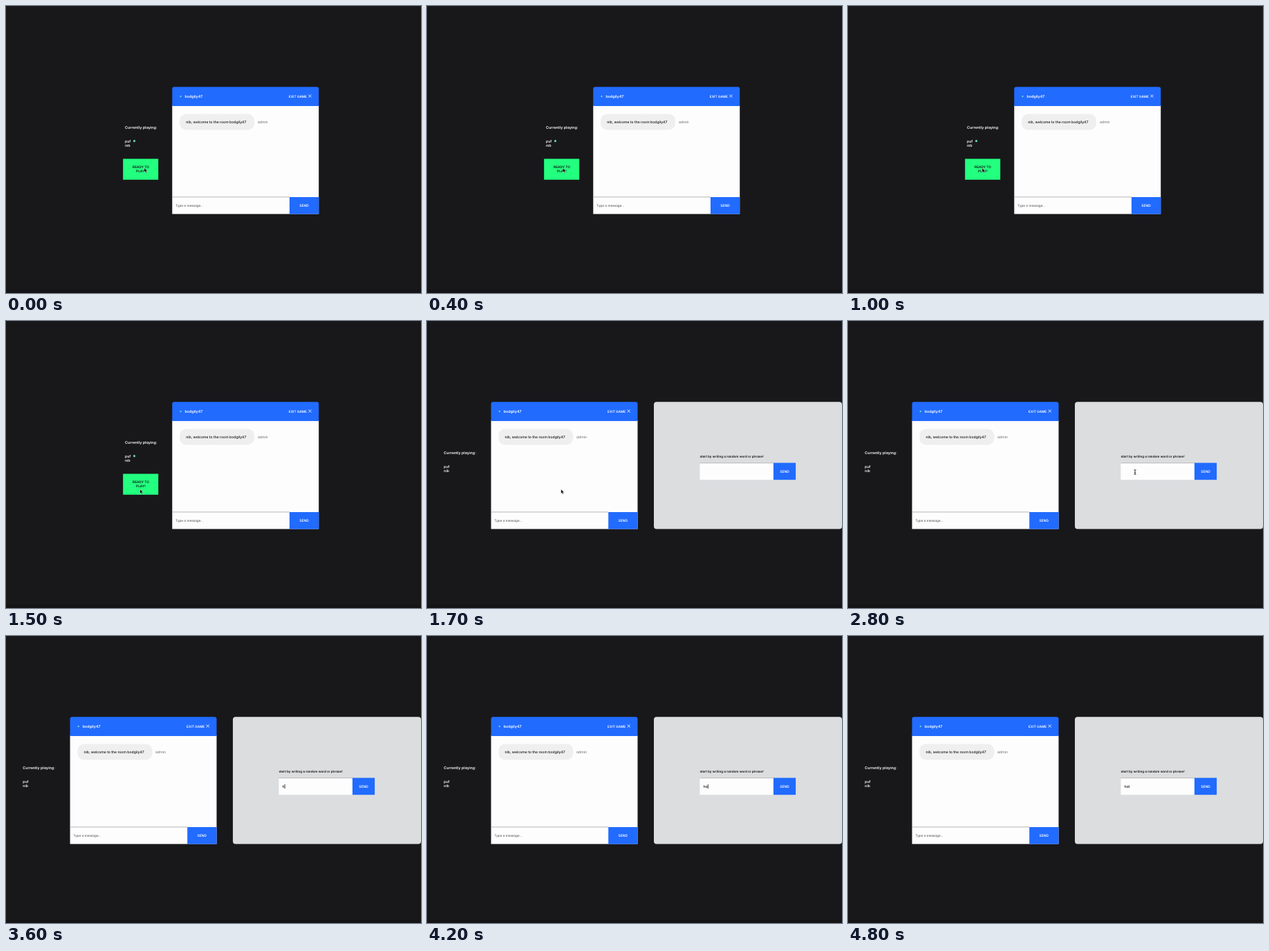
An HTML page for the animation above (5000 ms loop, 600 px wide and 416 px high).

```html
<!DOCTYPE html>
<html lang="en">
<head>
<meta charset="utf-8">
<title>Word game lobby</title>
<style>
  html, body { margin: 0; width: 100%; height: 100%; overflow: hidden; background: #18181a; }
  svg { display: block; width: 100%; height: 100%; }
  text {
    font: 500 5.1px Inter, sans-serif;
    font-feature-settings: "cv11";
    text-rendering: geometricPrecision;
    fill: #111;
  }
  .bold { font-weight: 600; }
  .light { fill: #fff; font-weight: 600; }
  .title { font-size: 5.35px; }
  .caps { font-size: 4.75px; }
  .middle { text-anchor: middle; }
  .blue { fill: #216bff; }
  .white { fill: #fdfdfd; }
  .rule { stroke: #a5a5a8; stroke-width: .8; }
</style>
</head>
<body>
<svg viewBox="0 0 600 416">
  <rect width="600" height="416" fill="#18181a"/>
  <rect y="411.5" width="600" height="4.5" fill="#141416"/>

  <g id="players">
    <text class="light title" x="172" y="178">Currently playing:</text>
    <text class="light" x="172" y="197.6">puf</text>
    <text class="light" x="172" y="203.6">nib</text>
  </g>

  <g id="lobby">
    <circle cx="185.5" cy="195.7" r="1.6" fill="#5fd3b3"/>
    <rect x="169.2" y="221.5" width="51" height="30.3" fill="#23ff7f"/>
    <text class="bold caps middle" x="195" y="235.3">READY TO</text>
    <text class="bold caps middle" x="195" y="241.3">PLAY!</text>
  </g>

  <g id="chat">
    <path class="white" d="M240.3 144H452.2V301.6H240.3Z"/>
    <path class="blue" d="M240.3 145V120.2Q240.3 117.2 243.3 117.2H449.2Q452.2 117.2 452.2 120.2V145Z"/>
    <circle cx="252.5" cy="131" r="1.2" fill="#5fd3d3"/>
    <text class="light title" x="258.4" y="132.8">bodgily47</text>
    <text class="light caps" x="408.8" y="132.6">EXIT GAME</text>
    <path d="M437.4 128.5l4 4m0 -4l-4 4" stroke="#fff" stroke-width=".9"/>
    <rect x="251" y="156.5" width="108" height="23" rx="9.5" fill="#efefef"/>
    <text x="260.2" y="169.8">nib, welcome to the room bodgily47</text>
    <text x="363.7" y="169.8" style="fill:#666;font-weight:400">admin</text>
    <path class="rule" d="M240.3 276.9H410"/>
    <rect class="blue" x="409.9" y="277" width="42.3" height="24.6"/>
    <text class="light middle" x="431" y="291.1" style="font-size:4.9px">SEND</text>
    <text x="245.3" y="291" style="fill:#444;font-weight:400;font-size:4.6px">Type a message...</text>
  </g>

  <g id="game">
    <rect x="328" y="117.2" width="272" height="184.4" rx="4" fill="#dcdddf"/>
    <text class="bold" x="394.4" y="198.4" style="font-size:4.6px">start by writing a random word or phrase!</text>
    <rect class="white" x="394.4" y="205.6" width="107" height="24.6"/>
    <path class="rule" d="M394.4 205.8H501"/>
    <rect class="blue" x="500.9" y="205.6" width="32.2" height="24.6"/>
    <text class="light middle" x="517" y="219.8" style="font-size:4.9px">SEND</text>
    <text id="word" x="399.4" y="220"></text>
    <rect id="caret" y="215" width=".8" height="6.2" fill="#111"/>
  </g>

  <path id="arrow" d="M0 0V6L1.4 4.8L2.4 7.1L3.5 6.6L2.5 4.4H4.3Z" fill="#000" stroke="#fff" stroke-width=".35"/>
  <path id="beam" d="M-1.5 -3.4Q0 -3.4 0 -2.6Q0 -3.4 1.5 -3.4M0 -2.8V2.8M-1.5 3.4Q0 3.4 0 2.6Q0 3.4 1.5 3.4M-.9 .9H.9" fill="none" stroke="#111" stroke-width=".8"/>
</svg>
<script>
const LOOP = 5000, STEP = 100;
const GAME_START = 1700, BEAM_START = 2700, FOCUS = 2900, FIRST_KEY = 3600;
const BLINK = 500;

// [ms, x, y] of the pointer's hot spot
const pointerPath = [
  [0, 200, 234.8], [500, 195.5, 235], [700, 195.5, 235], [1000, 194, 235],
  [1300, 193.8, 242.5], [1500, 193.8, 244], [2300, 193.8, 244],
  [2400, 204, 242], [2500, 268, 227], [2600, 350, 211], [2700, 405, 214], [2800, 415, 219]
];
// Each key press restarts the caret blink
const typing = [[FOCUS, ""], [FIRST_KEY, "h"], [4000, "ha"], [4300, "hat"]];

const el = id => document.getElementById(id);
const show = (id, visible) => el(id).setAttribute("display", visible ? "inline" : "none");
const move = (id, x, y) => el(id).setAttribute("transform", `translate(${x} ${y})`);

function pointerAt(t) {
  const next = pointerPath.findIndex(p => p[0] > t);
  if (next < 0) return pointerPath.at(-1).slice(1);
  const [t0, x0, y0] = pointerPath[next - 1], [t1, x1, y1] = pointerPath[next];
  const k = (t - t0) / (t1 - t0);
  return [x0 + (x1 - x0) * k, y0 + (y1 - y0) * k];
}

function render(now) {
  const t = Math.floor(now % LOOP / STEP) * STEP;
  const playing = t >= GAME_START;
  show("lobby", !playing);
  show("game", playing);
  move("players", playing ? -147.7 : 0, playing ? 15.2 : 0);
  move("chat", playing ? -147.7 : 0, 0);

  const [x, y] = pointerAt(t);
  move("arrow", x, y);
  move("beam", x, y);
  show("arrow", t < BEAM_START);
  show("beam", t >= BEAM_START && t < FIRST_KEY);

  const [since, typed] = typing.findLast(k => k[0] <= t) || [Infinity, ""];
  const word = el("word");
  word.textContent = typed;
  show("caret", t >= since && Math.floor((t - since) / BLINK) % 2 === 0);
  el("caret").setAttribute("x", 399.6 + (typed ? word.getComputedTextLength() : 0));
}

function tick() {
  render(performance.now());
  requestAnimationFrame(tick);
}
tick();
</script>
</body>
</html>
```
